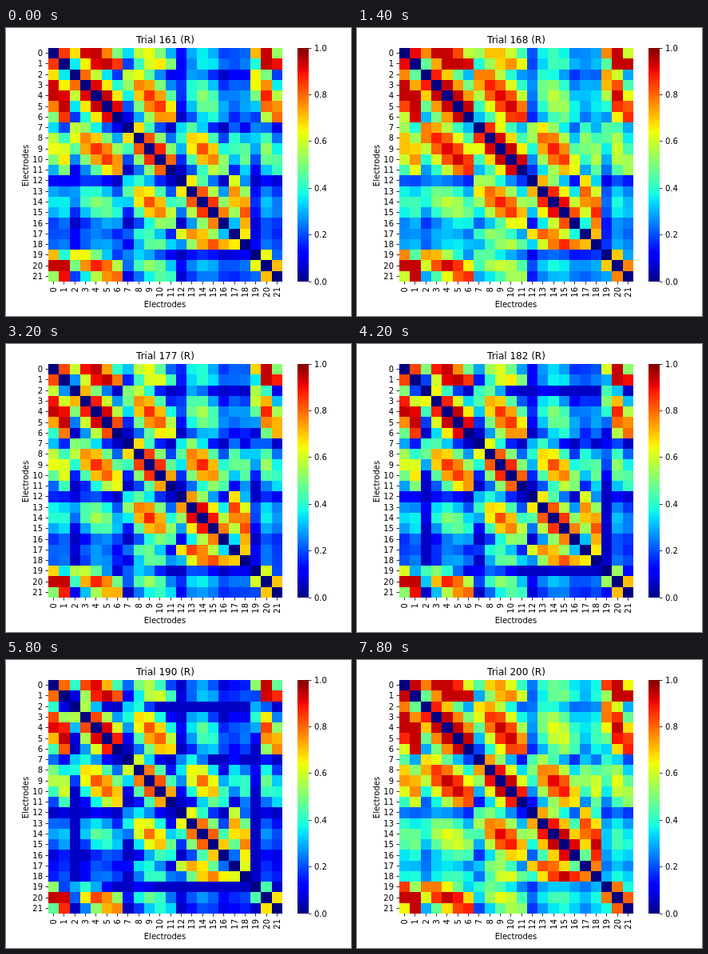
Animation of 432x360 px, one loop 8000 ms. Source, as an HTML page:

```html
<!DOCTYPE html>
<html lang="en">
<head>
<meta charset="utf-8">
<title>Electrode coupling by trial</title>
<style>
  html, body { margin: 0; width: 100%; height: 100%; overflow: hidden; background: #fff; }
  svg { display: block; width: 432px; height: 360px; }
  text { font: 10px "DejaVu Sans", sans-serif; fill: #000; }
  .title { font-size: 12px; }
  .mid { text-anchor: middle; }
  .end { text-anchor: end; }
  .tick { stroke: #000; stroke-width: .8; }
  .crisp { shape-rendering: crispEdges; }
</style>
</head>
<body>
<svg viewBox="0 0 432 360">
  <defs><linearGradient id="jet" x1="0" y1="1" x2="0" y2="0"></linearGradient></defs>
  <g id="cells" class="crisp"></g>
  <rect class="crisp" x="365" y="25" width="14" height="292" fill="url(#jet)"/>
  <g id="axes"></g>
  <text class="mid title" id="title" x="199.5" y="19"></text>
  <text class="mid" x="199" y="349">Electrodes</text>
  <text class="mid" transform="translate(28 172) rotate(-90)">Electrodes</text>
</svg>
<script>
const LEFT = 53, TOP = 25, WIDTH = 293, HEIGHT = 292;
const FIRST = 161, TRIALS = 40, STEP = 200;
const byId = id => document.getElementById(id);
const clamp = (v, lo, hi) => Math.min(hi, Math.max(lo, v));
const bell = (dx, dy, spread) => Math.exp(-(dx * dx + dy * dy) / spread);

// The electrodes sit on the scalp in rows, numbered from left to right.
const rows = [
  { count: 2, y: 2, gap: 1.4, shift: .2 },
  { count: 5, y: 1.25, gap: .95 },
  { count: 5, y: 0, gap: 1.1 },
  { count: 5, y: -1.2, gap: .95, bend: .2 },
  { count: 2, y: -2.4, gap: 1.5 },
  { count: 3, y: 2.6, gap: 1.9 }
];
const electrodes = rows.flatMap(({ count, y, gap, shift = 0, bend = 0 }) =>
  Array.from({ length: count }, (_, i) => {
    const x = (i - (count - 1) / 2) * gap + shift;
    return { x, y: y - bend * x * x };
  }));
const COUNT = electrodes.length;

// Coupling is strongest in the middle and weakens towards the left, back and rim.
const strength = ({ x, y }) => .035 + .018 * y + .02 * x - .022 * x * x;
const coupling = (a, b) => .15 + .8 * bell(a.x - b.x, a.y - b.y, 6) + strength(a) + strength(b);

// Between these trials an overall lift and local spots [x, y, amount] blend linearly.
const moods = [
  { trial: 161, lift: 0, spots: [] },
  { trial: 168, lift: .03, spots: [[-2.2, 0, .14], [2.2, 0, .07]] },
  { trial: 177, lift: 0, spots: [[-1, -1.2, .09], [2.2, .8, -.1], [-2, 1.2, -.08]] },
  { trial: 182, lift: 0, spots: [[-2.4, 1.6, -.22]] },
  { trial: 190, lift: -.02, spots: [[-2.4, 1.7, -.32], [2.2, -1, -.08]] },
  { trial: 196, lift: 0, spots: [[-2.3, 0, -.12], [2.2, -1.2, -.19], [-1.9, 2.8, -.08]] },
  { trial: 200, lift: .05, spots: [[1.5, -2, .06], [-1.9, 2.6, .05]] }
];
const moodAt = ({ lift, spots }, { x, y }) =>
  spots.reduce((sum, [sx, sy, amount]) => sum + amount * bell(x - sx, y - sy, 1.5), lift);

function random(seed) {
  const s = Math.sin(seed * 12.9898) * 43758.5453;
  return s - Math.floor(s);
}

function driftsAt(trial) {
  const next = Math.max(1, moods.findIndex(m => m.trial >= trial));
  const from = moods[next - 1], to = moods[next];
  const u = (trial - from.trial) / (to.trial - from.trial);
  return electrodes.map((e, i) => {
    const jitter = (random(trial * COUNT + i) - .5) * .1 * Math.sin(Math.PI * u);
    return moodAt(from, e) * (1 - u) + moodAt(to, e) * u + jitter;
  });
}

// Colour ramps for red, green and blue.
const channels = [
  [[0, 0], [.35, 0], [.66, 1], [.89, 1], [1, .5]],
  [[0, 0], [.125, 0], [.375, 1], [.64, 1], [.91, 0], [1, 0]],
  [[0, .5], [.11, 1], [.34, 1], [.65, 0], [1, 0]]
];

function ramp(v, points) {
  const i = Math.max(1, points.findIndex(p => v <= p[0]));
  const [x0, y0] = points[i - 1], [x1, y1] = points[i];
  return y0 + (y1 - y0) * (v - x0) / (x1 - x0);
}
const jet = v => `rgb(${channels.map(c => Math.round(255 * ramp(v, c)))})`;

function add(parent, name, attrs, text = "") {
  const node = document.createElementNS("http://www.w3.org/2000/svg", name);
  for (const key in attrs) node.setAttribute(key, attrs[key]);
  node.textContent = text;
  return parent.appendChild(node);
}

const edgeX = i => LEFT + i * WIDTH / COUNT;
const edgeY = i => TOP + i * HEIGHT / COUNT;

function drawAxes() {
  const axes = byId("axes");
  const tick = (x, y, dx, dy) => add(axes, "path", { class: "tick", d: `M${x} ${y}l${dx} ${dy}` });
  for (let i = 0; i < COUNT; i++) {
    const x = Math.floor(edgeX(i + .5)) + .5, y = Math.floor(edgeY(i + .5)) + .5;
    tick(LEFT, y, -3.5, 0);
    tick(x, TOP + HEIGHT, 0, 3.5);
    add(axes, "text", { class: "end", x: 46, y: Math.round(y + 3.4) }, i);
    add(axes, "text", { class: "end", transform: `translate(${Math.round(x + 3.4)} 324) rotate(-90)` }, i);
  }
  for (let i = 0; i <= 5; i++) {
    const y = Math.floor(TOP + HEIGHT * (1 - i / 5)) + .5;
    tick(379, y, 3.5, 0);
    add(axes, "text", { x: 386, y: Math.round(y + 3.4) }, (i / 5).toFixed(1));
  }
  const stops = [...new Set(channels.flat().map(p => p[0]))].sort((a, b) => a - b);
  for (const s of stops) add(byId("jet"), "stop", { offset: s, "stop-color": jet(s) });
}

function makeCell(row, col) {
  const x = Math.round(edgeX(col)), y = Math.round(edgeY(row));
  const width = Math.round(edgeX(col + 1)) - x, height = Math.round(edgeY(row + 1)) - y;
  const a = electrodes[row], b = electrodes[col];
  return {
    row, col,
    rect: add(byId("cells"), "rect", { x, y, width, height }),
    rest: coupling(a, b),
    // Neighbours drift together, so their coupling changes less.
    give: Math.min(1, .4 + .3 * Math.hypot(a.x - b.x, a.y - b.y))
  };
}
const cells = electrodes.flatMap((_, row) => electrodes.map((_, col) => makeCell(row, col)));

function draw(trial) {
  const drift = driftsAt(trial);
  byId("title").textContent = `Trial ${trial} (R)`;
  for (const { row, col, rect, rest, give } of cells) {
    const value = row === col ? 0 : clamp(rest + (drift[row] + drift[col]) * give, .06, .94);
    rect.setAttribute("fill", jet(value));
  }
}

drawAxes();
const start = performance.now();
let shown = -1;
function play(now) {
  const step = Math.floor(Math.max(0, now - start) / STEP) % TRIALS;
  if (step !== shown) draw(FIRST + (shown = step));
  requestAnimationFrame(play);
}
play(start);
</script>
</body>
</html>
```
